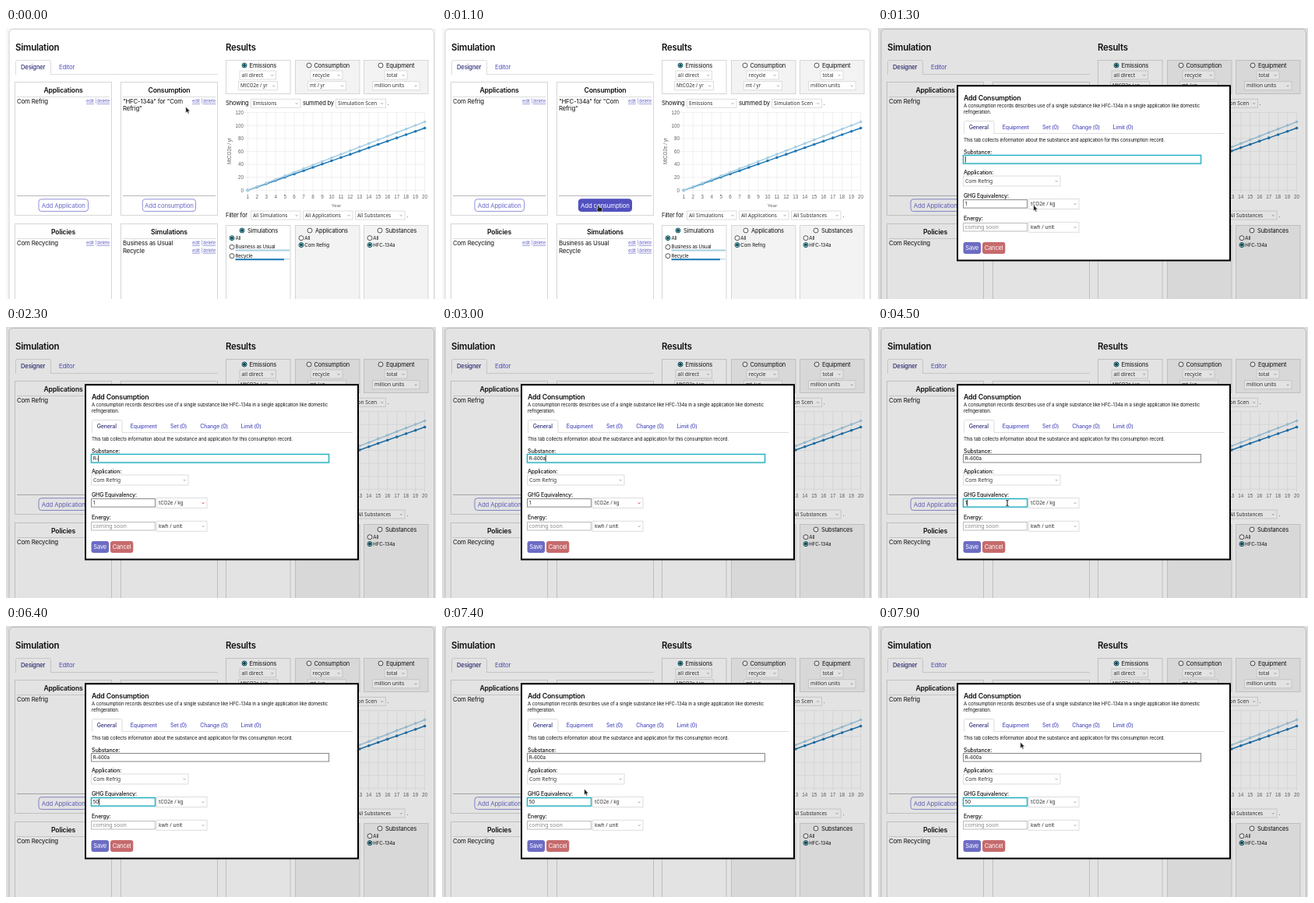
Recreate the animation shown at these times as an HTML page. Size 552 px wide and 348 px high, loop 8 s.

```html
<!DOCTYPE html>
<html lang="en">
<head>
<meta charset="utf-8">
<title>Simulation designer</title>
<style>
html, body { margin: 0; width: 100%; height: 100%; overflow: hidden; background: #f7f7f7; }
svg { display: block; }
text { font-family: Inter, sans-serif; letter-spacing: -.02em; white-space: pre; fill: #111; }
.form { font-family: "Noto Sans", sans-serif; letter-spacing: 0; fill: #333; }
.hint { fill: #888; }
.chart { font-family: "Liberation Sans", sans-serif; letter-spacing: 0; fill: #666; }
.b { font-weight: 600; }
.m { font-weight: 500; }
.link { fill: #5050c0; }
.soft { fill: #6a6aca; }
.tab { fill: #2e2e7a; }
.white { fill: #fff; }
.u { text-decoration: underline; }
.mid { text-anchor: middle; }
.end { text-anchor: end; }
</style>
</head>
<body>
<svg id="stage" width="552" height="348" viewBox="0 0 552 348"></svg>
<script>
const LOOP = 8000, STEP = 100, INDIGO = '#5050c0', TEAL = '#064f5c';
const LIGHT = '#a6cee3', DARK = '#1f78b4', BORDER = '#d6d6d6';

const text = (x, y, s, size = 7.8, cls = '', more = '') =>
  `<text x="${x}" y="${y}" font-size="${size}" class="${cls}" ${more}>${s}</text>`;
const rect = (x, y, w, h, fill = '#fff', stroke = 'none', more = '') =>
  `<rect x="${x}" y="${y}" width="${w}" height="${h}" fill="${fill}" stroke="${stroke}" ${more}/>`;
const line = (x1, y1, x2, y2, color = BORDER, w = 1) =>
  `<path d="M${x1} ${y1}L${x2} ${y2}" stroke="${color}" stroke-width="${w}"/>`;
const range = (n, f) => Array.from({ length: n }, (_, i) => f(i)).join('');

function select(x, y, w, s, size, h = 12, id = '') {
  return rect(x + .5, y + .5, w - 1, h - 1, '#fff', '#ddd') +
    text(x + 3, y + h / 2 + 2.1, s, size, 'form') +
    `<path ${id && `id="${id}"`} d="M${x + w - 6.8} ${y + h / 2 - .6}l1.4 1.6 1.4-1.6" fill="none" stroke="#999" stroke-width=".8"/>`;
}

function radio(x, y, on, s, size = 7.5, gap = 7) {
  return `<circle cx="${x}" cy="${y}" r="3" fill="#fff" stroke="${on ? TEAL : '#555'}"/>` +
    (on ? `<circle cx="${x}" cy="${y}" r="2" fill="${TEAL}"/>` : '') +
    text(x + gap, y + size * .35, s, size);
}

const edit = (right, y) =>
  text(right - 30, y, 'edit', 5.9, 'soft u') + text(right - 18.6, y, '|', 5.9, 'soft') +
  text(right - 16.3, y, 'delete', 5.9, 'soft u');

const card = (x, y, title) =>
  rect(x + .5, y + .5, 124, 171, '#fff', BORDER) +
  text(x + 62.5, y + 13.6, title, 8.65, 'b mid') +
  line(x + 3, y + 19.5, x + 122, y + 19.5, '#ddd') +
  line(x + 3, y + 146.5, x + 122, y + 146.5, '#b8b8b8');

const button = (x, w, s, id) =>
  `<g id="${id}">` + rect(x, 219.8, w, 15.6, '#fff', '#9090d8', 'rx="3.5"') +
  text(x + w / 2, 230.6, s, 7.8, 'mid soft') + '</g>';

const panel = (x, y, h, on) =>
  rect(x + .5, y + .5, 82.5, h, on ? '#fff' : '#f3f3f3', BORDER);

const tabs = (x, y, w, h, end) =>
  line(x, y + h + .5, end, y + h + .5, '#ddd') +
  `<path d="M${x + .5} ${y + h + 1}V${y + 2.5}q0-2 2-2H${x + w - 2.5}q2 0 2 2V${y + h + 1}" fill="#fff" stroke="#ddd"/>`;

function designer() {
  return text(12, 29, 'Simulation', 11.5, 'b') + tabs(12, 41, 46, 18, 272) +
    text(19, 53, 'Designer', 7.6, 'm tab') + text(68, 53, 'Editor', 7.7, 'link') +
    card(11, 69, 'Applications') + card(147, 69, 'Consumption') +
    card(11, 251, 'Policies') + card(147, 251, 'Simulations') +
    text(14, 97, 'Com Refrig') + edit(133, 96.2) +
    text(150, 97, '"HFC-134a" for "Com') + text(150, 106.3, 'Refrig"') + edit(269, 96.2) +
    text(14, 279, 'Com Recycling') + edit(133, 278.3) +
    text(150, 279, 'Business as Usual') + edit(269, 278.3) +
    text(150, 288.6, 'Recycle') + edit(269, 287.9) +
    button(42, 63.5, 'Add Application', 'addApp') + button(175.3, 68.2, 'Add consumption', 'addUse');
}

function chart() {
  const px = i => 310.3 + i * 11.96, py = v => 208.4 - v * .832;
  const series = (color, end) => {
    const at = i => `${px(i).toFixed(1)},${py(end * i / 19).toFixed(1)}`;
    return `<polyline points="${range(20, i => at(i) + ' ')}" fill="none" stroke="${color}" stroke-width="1.5"/>` +
      range(20, i => `<circle cx="${px(i)}" cy="${py(end * i / 19)}" r="1.8" fill="${color}"/>`);
  };
  return range(20, i => line(px(i), py(120), px(i), 212, '#e6e6e6', .6) +
      text(px(i), 218.6, i + 1, 6.3, 'chart mid')) +
    range(7, i => line(306.5, py(i * 20), 537.6, py(i * 20), '#e6e6e6', .6) +
      text(305, py(i * 20) + 2.3, i * 20, 6.3, 'chart end')) +
    text(424, 230, 'Year', 6.2, 'chart mid') +
    text(0, 0, 'MtCO2e / yr', 6.3, 'chart mid', 'transform="translate(289 158) rotate(-90)"') +
    series(DARK, 96) + series(LIGHT, 105.7);
}

function results() {
  return text(282, 29, 'Results', 11.3, 'b') +
    panel(282, 41, 43, true) + panel(371, 41, 43) + panel(459, 41, 43) +
    radio(306, 48, true, 'Emissions', 7.6, 6.5) + radio(389, 48, false, 'Consumption', 7.5, 6.5) +
    radio(481, 48, false, 'Equipment') +
    select(299.5, 54.5, 47.5, 'all direct', 6.9) + select(298, 68.2, 51, 'MtCO2e / yr', 6.2) +
    select(390.5, 54.5, 42, 'recycle', 6.8) + select(387, 68.2, 50, 'mt / yr', 6.2) +
    select(485.5, 54.5, 30, 'total', 6.5) + select(470, 68.2, 61.5, 'million units', 6.6) +
    text(282, 99.2, 'Showing', 7.5) + select(314, 90.8, 64.5, 'Emissions', 6.5) +
    text(381, 99.2, 'summed by', 7.5) + select(423, 90.8, 65, 'Simulation Scen', 6.7) +
    text(489.5, 99.2, '.', 7.5) + chart() +
    text(282, 243, 'Filter for', 7.4) + select(314, 234.5, 64.5, 'All Simulations', 6.4) +
    select(381, 234.5, 64.5, 'All Applications', 6.4) + select(448, 234.5, 64.5, 'All Substances', 6.4) +
    text(514.5, 243, '.', 7.5) +
    panel(282, 253, 110, true) + panel(371, 253, 110) + panel(459, 253, 110) +
    radio(303, 260, true, 'Simulations') + radio(390, 260, false, 'Applications') +
    radio(480, 260, false, 'Substances') +
    radio(290, 269.7, true, 'All', 6.2, 4.5) + radio(290, 281.3, false, 'Business as Usual', 6.2, 4.5) +
    radio(290, 292.7, false, 'Recycle', 6.2, 4.5) +
    line(294.5, 285.6, 364, 285.6, LIGHT, 2) +
    line(294.5, 296.8, 364, 296.8, LIGHT, 1) + line(294.5, 297.3, 357, 297.3, DARK, 2) +
    radio(379, 269.7, false, 'All', 6.2, 4.3) + radio(379, 278.6, true, 'Com Refrig', 6.2, 4.3) +
    radio(467, 269.7, false, 'All', 6.2, 4.3) + radio(467, 278.6, true, 'HFC-134a', 6.1, 4.3);
}

const field = (id, y, w) =>
  rect(109.5, y, w, 10.5, '#fff', '#888', `id="${id}Box"`) +
  `<g id="${id}Ring">` + rect(109, y - .5, w + 1, 11.5, 'none', '#d4f0f4', 'stroke-width="2.6" rx="1"') +
  rect(109.5, y, w, 10.5, 'none', '#20b0c0', 'stroke-width="1.2"') + '</g>' +
  text(111.8, y + 7.7, '', 6.1, '', `id="${id}"`);

function dialog() {
  return rect(0, 0, 552, 348, '#000', 'none', 'opacity=".11"') +
    rect(102, 74.2, 350, 224.3, '#fff', '#000', 'stroke-width="2"') +
    text(110, 93, 'Add Consumption', 8.75, 'b') +
    text(110, 102.4, 'A consumption records describes use of a single substance like HFC-134a in a single application like domestic', 6.07) +
    text(110, 109.6, 'refrigeration.', 6.07) + tabs(110, 119, 39.5, 16, 445) +
    text(116.7, 130, 'General', 7, 'm tab') + text(159.8, 130, 'Equipment', 6.9, 'm link') +
    text(211, 130, 'Set (0)', 6.9, 'm link') + text(249.3, 130, 'Change (0)', 6.9, 'm link') +
    text(301.6, 130, 'Limit (0)', 6.9, 'm link') +
    text(110, 145.7, 'This tab collects information about the substance and application for this consumption record.', 6.07) +
    text(110, 161.6, 'Substance:', 7, 'm') + text(110, 188.2, 'Application:', 7, 'm') +
    text(110, 217.9, 'GHG Equivalency:', 7, 'm') + text(110, 247.4, 'Energy:', 7, 'm') +
    select(109, 189.5, 125.5, 'Com Refrig', 6.7, 14) +
    select(193, 219, 65.5, 'tCO2e / kg', 6.4, 14, 'unitArrow') +
    select(193, 248.8, 65.5, 'kwh / unit', 6.5, 14) +
    rect(109.5, 250.5, 82, 10.5, '#fff', '#bbb') + text(111.8, 258.2, 'coming soon', 7.1, 'form hint') +
    rect(109.5, 275, 22.5, 15, '#6c6cc4', 'none', 'rx="3"') + text(120.7, 285.2, 'Save', 7.5, 'mid white') +
    rect(134, 275, 29.3, 15, '#c66a6c', 'none', 'rx="3"') + text(148.6, 285.2, 'Cancel', 7.5, 'mid white') +
    field('substance', 163.5, 305) + field('ghg', 220.6, 82) +
    rect(0, 0, .8, 8, '#000', 'none', 'id="caret"');
}

const cursors = {
  arrow: '<path d="M0 0V8.2L1.8 6.5 3.1 9.3 4.5 8.7 3.3 5.9H5.7Z" fill="#222" stroke="#fff" stroke-width=".6"/>',
  hand: '<path d="M-1.2 .6Q0-.6 1 .6V2.7Q4.8 2.6 4.8 4.4V6L4 8.4H-.8L-3 5.2Q-2.8 3.8-1.2 4.8Z" fill="#222" stroke="#fff" stroke-width=".6"/>',
  beam: '<path d="M-1.6-3.6Q0-3.6 0-2.6Q0-3.6 1.6-3.6M0-3V3M-1.6 3.6Q0 3.6 0 2.6Q0 3.6 1.6 3.6" fill="none" stroke="#000" stroke-width=".9"/>'
};

const stage = document.getElementById('stage');
stage.innerHTML = rect(4, 1.5, 545.5, 380, '#fff', '#d0d0d0', 'rx="5"') + designer() + results() +
  `<g id="dialog">${dialog()}</g>` +
  Object.keys(cursors).map(k => `<g id="${k}">${cursors[k]}</g>`).join('');
const el = id => document.getElementById(id);
const show = (id, on) => el(id).setAttribute('display', on ? 'inline' : 'none');

// Pointer paths: [start, end, x0, y0, x1, y1]
const moves = [
  [400, 1100, 230.7, 101, 201, 227.5],
  [1200, 1300, 201, 227.5, 199.5, 227],
  [3800, 4300, 199.5, 227, 166, 226],
  [7200, 7400, 207, 218, 182.5, 209],
  [7500, 7900, 182.5, 209, 182.7, 149]
];
const hidden = [[1900, 3800], [5700, 7200]];
const within = (t, a, b) => t >= a && t < b;

function pointer(t) {
  const [a, b, x0, y0, x1, y1] = moves.filter(m => m[0] <= t).pop() || moves[0];
  const p = Math.max(0, Math.min(1, (t - a) / (b - a))), k = p * p * (3 - 2 * p);
  return [x0 + (x1 - x0) * k, y0 + (y1 - y0) * k];
}

// Characters of s typed by time t
const typed = (s, times, t) => s.slice(0, times.filter(v => v <= t).length);

function draw(now) {
  const t = Math.floor(now % LOOP / STEP) * STEP;
  const open = t >= 1300, [x, y] = pointer(t);
  const overButton = !open && y > 219;
  const overField = open && x < 191 && (within(y, 163, 175) || within(y, 220, 232));
  const kind = overButton ? 'hand' : overField ? 'beam' : 'arrow';
  const visible = !hidden.some(([a, b]) => within(t, a, b));
  for (const k in cursors) {
    show(k, visible && k === kind);
    el(k).setAttribute('transform', `translate(${x} ${y})`);
  }

  const [box, label] = el('addUse').children;
  box.setAttribute('fill', overButton ? INDIGO : '#fff');
  box.setAttribute('stroke', overButton ? INDIGO : '#9090d8');
  label.setAttribute('class', overButton ? 'mid white' : 'mid soft');

  show('dialog', open);
  if (open) {
    const onGhg = t >= 4300, focus = el(onGhg ? 'ghg' : 'substance');
    el('substance').textContent = typed('R-600a', [1900, 2300, 2600, 2800, 2900, 3000], t);
    el('ghg').textContent = t < 5700 ? '1' : typed('50', [6300, 6400], t);
    show('ghgRing', onGhg);
    show('substanceRing', !onGhg);
    el('substanceBox').setAttribute('stroke', t > 7000 && within(y, 163, 175) ? '#222' : '#888');
    el('unitArrow').setAttribute('stroke', within(t, 1600, 4100) ? '#e03030' : '#999');
    const caret = el('caret');
    caret.setAttribute('x', 111.8 + focus.getComputedTextLength());
    caret.setAttribute('y', onGhg ? 221.9 : 164.8);
    show('caret', t < 6900);
  }
  requestAnimationFrame(draw);
}
requestAnimationFrame(draw);
</script>
</body>
</html>
```
